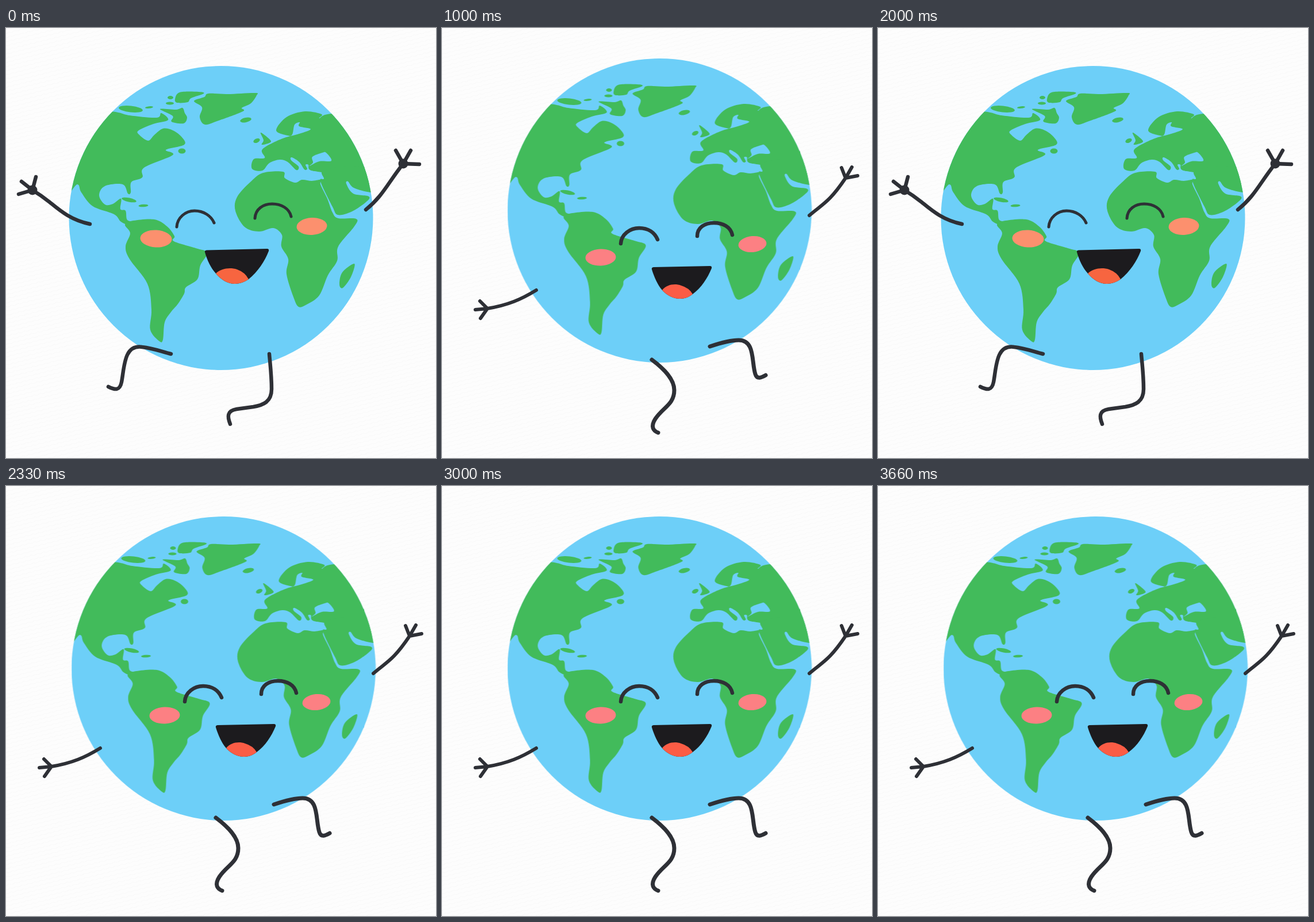
Animation, 748 px wide and 748 px high, one loop 4000 ms. Source, as an HTML page:

```html
<!DOCTYPE html>
<html lang="en">
<head>
<meta charset="utf-8">
<title>Dancing globe</title>
<style>
  html, body { margin: 0; width: 100%; height: 100%; overflow: hidden; background: #fdfdfd; }
  svg { display: block; width: 100vw; height: 100vh; }
  .land { fill: #42bb5b; }
  .sea { fill: #6dcff8; }
  .line { fill: none; stroke: #2e3036; stroke-linecap: round; stroke-linejoin: round; }
  .mouth { fill: #1c1b1e; }
</style>
</head>
<body>
<svg viewBox="0 0 748 748">
  <defs>
    <pattern id="paper" width="11" height="7" patternUnits="userSpaceOnUse" patternTransform="rotate(-14)">
      <path d="M0 2q3-2 5 0t6 0" fill="none" stroke="#f8f8f8"/>
    </pattern>
    <clipPath id="disc"><circle cx="374" cy="330.5" r="264.5"/></clipPath>
  </defs>
  <rect width="748" height="748" fill="url(#paper)"/>

  <g id="globe">
    <circle class="sea" cx="374" cy="330.5" r="264.5"/>
    <g id="map" clip-path="url(#disc)"></g>
  </g>

  <g id="up">
    <g class="line" stroke-width="5">
      <path d="M297 346C298 330 312 318 328 318S357 327 362 339"/>
      <path d="M433 331C434 315 447 306 463 306S493 314 496 328"/>
    </g>
    <g fill="#fc906e">
      <ellipse cx="261" cy="366.5" rx="27.5" ry="15" transform="rotate(3 261 366)"/>
      <ellipse cx="532" cy="345" rx="26.5" ry="15" transform="rotate(-3 532 345)"/>
    </g>
    <path class="mouth" d="M346 390Q345 387 349 386.5L454 384Q458 384 457 388C450 406 438 424 422 437C416 441 408 445 398 445C386 445 374 438 365 427C356 417 350 404 346 390Z"/>
    <path fill="#f76540" d="M365 427C374 418 390 416 402 420Q416 425 422 437C416 441 408 445 398 445C386 445 374 438 365 427Z"/>
    <g class="line" stroke-width="6.5">
      <path d="M146 341C112 334 92 316 76 303Q61 291 46 282L27 267M46 282L52 259M46 282L22 289"/>
      <path d="M626 316C655 293 664 270 691 236L678 213M691 236L704 213M691 236L719 237"/>
      <path d="M287 567C268 562 255 557 237 555C205 550 206 590 201 616C198 631 190 630 178 624"/>
      <path d="M458 567C460 590 462 605 462 628C462 650 448 656 430 659L401 663C384 666 385 676 390 689"/>
    </g>
    <g fill="#2e3036"><circle cx="46" cy="282" r="8.5"/><circle cx="691" cy="236" r="8.5"/></g>
  </g>

  <g id="down" opacity="0">
    <g class="line" stroke-width="6.5">
      <path d="M311 375C312 359 327 348 343 348S370 356 375 368"/>
      <path d="M444 362C444 347 457 339 473 339S502 346 505 360"/>
    </g>
    <g fill="#fc8083">
      <ellipse cx="276" cy="399" rx="26.5" ry="14.5" transform="rotate(-2 276 399)"/>
      <ellipse cx="540" cy="376" rx="24.5" ry="14" transform="rotate(-5 540 376)"/>
    </g>
    <path class="mouth" d="M365 420Q364 416.5 368 416L466 414Q470 414 469 418C462 435 451 452 436 463C430 468 422 471 414 471C403 471 391 465 383 456C375 447 369 433 365 420Z"/>
    <path fill="#fb5c45" d="M383 456C391 446 405 444 416 448Q430 452 436 463C430 468 422 471 414 471C403 471 391 465 383 456Z"/>
    <g class="line" stroke-width="6">
      <path d="M164 456C138 472 115 482 79 488L58 490M79 488L66 475M79 488L67 505"/>
      <path d="M639 326C662 306 673 304 702 261L695 243M702 261L713 242M702 261L723 257"/>
    </g>
    <g class="line" stroke-width="7">
      <path d="M365 577C385 592 404 610 404 630C404 655 384 660 371 680C362 694 368 701 376 704"/>
      <path d="M466 554C490 546 505 543 516 543C545 543 538 580 545 602C548 612 556 608 563 604"/>
    </g>
  </g>
</svg>
<script>
  const $ = id => document.getElementById(id);

  function draw(tag, kind, attrs) {
    const el = document.createElementNS('http://www.w3.org/2000/svg', tag);
    el.setAttribute('class', kind);
    for (const key in attrs) el.setAttribute(key, attrs[key]);
    $('map').append(el);
  }

  // Closed smooth curve through "x,y x,y ..." points.
  function blob(text, kind = 'land') {
    const pts = text.trim().split(/\s+/).map(p => p.split(',').map(Number));
    const at = i => pts[(i + pts.length) % pts.length];
    const handle = (i, sign) =>
      [0, 1].map(k => (at(i)[k] + sign * (at(i + 1)[k] - at(i - 1)[k]) / 6).toFixed(1));
    let d = 'M' + pts[0];
    pts.forEach((_, i) => { d += `C${handle(i, 1)} ${handle(i + 1, -1)} ${at(i + 1)}`; });
    draw('path', kind, { d: d + 'Z' });
  }

  function islet(cx, cy, rx, ry, turn = 0) {
    draw('ellipse', 'land', { cx, cy, rx, ry, transform: `rotate(${turn} ${cx} ${cy})` });
  }

  // North America
  blob(`100,140 183,145 215,152 262,156 270,148 282,160 256,167 231,178 231,185 247,196 258,186
    273,175 290,178 306,190 310,203 278,212 290,221 240,243 237,260 218,268 217,286 212,288
    203,272 172,275 162,291 172,307 186,306 200,297 199,315 208,318 211,334 225,338 217,344
    200,337 188,324 151,310 131,286 124,272 100,284`);
  // South America
  blob(`207,342 222,335 258,333 280,345 293,362 292,371 330,383 350,391 338,413 333,437 313,451
    310,462 299,480 287,494 276,512 273,542 267,545 251,525 253,490 246,445 215,402 208,380
    216,357`);
  // Greenland and the northern islands
  blob(`327,127 345,120 352,114 385,115 433,113 436,117 426,131 410,139 412,145 370,161 346,168
    337,155 341,138`);
  blob('294,124 302,112 335,111 344,114 322,122 316,129 298,130');
  blob('268,141 296,142 307,139 311,148 315,156 309,166 288,163 290,153');
  islet(217, 141, 21, 5.5, 6);
  islet(417, 160, 10, 4, -12);
  islet(286, 121, 5, 3);
  islet(285, 131, 7, 2.5);
  islet(249, 138, 7, 1.8, -6);
  islet(306, 214, 6.5, 4.5);
  // Caribbean
  islet(214, 299, 13, 3.5, 12);
  islet(239, 309, 8.5, 2.3, -3);
  // Europe
  blob(`470,178 488,155 520,145 549,150 545,157 567,149 660,150 660,270 555,252 529,247 526,238
    521,238 524,245 519,246 510,233 497,225 496,230 509,241 505,247 490,233 476,229 458,235
    446,248 428,245 431,228 450,226 446,211 479,193 510,184 530,176 510,171 511,164 502,168
    498,185 490,187`);
  blob('534,234 533,224 550,217 557,217 566,231 545,232 528,240', 'sea');
  blob('443,182 458,193 460,199 445,203 448,195');
  islet(436, 196, 6, 3.5, -25);
  // Arabia
  blob(`552,248 600,240 660,250 660,286 634,286 605,278 595,267 592,271 604,288 631,293 626,303
    600,320 577,325 568,311 547,267 553,262`);
  // Africa
  blob(`447,252 482,250 485,261 503,269 515,264 532,266 549,264 547,272 559,297 568,321 578,331
    609,332 606,345 578,380 576,405 560,430 545,465 523,481 509,485 500,468 488,428 491,402
    479,380 480,360 465,348 440,354 415,346 399,318 402,294 425,268`);
  blob('606,410 600,433 586,452 580,446 585,425');

  // Two poses swap with hard cuts.
  const CYCLE = 2000;
  const CUTS = [0, 330, 660, 1000, 1330, 1660, 2000];

  function swap(id, prop, first, second) {
    const frames = CUTS.map((ms, i) => ({
      offset: ms / CYCLE, easing: 'step-end', [prop]: i % 2 ? second : first
    }));
    $(id).animate(frames, { duration: CYCLE, iterations: Infinity });
  }

  swap('globe', 'transform', 'translate(0px, 0px)', 'translate(4.5px, -13px)');
  swap('up', 'opacity', 1, 0);
  swap('down', 'opacity', 0, 1);
</script>
</body>
</html>
```
